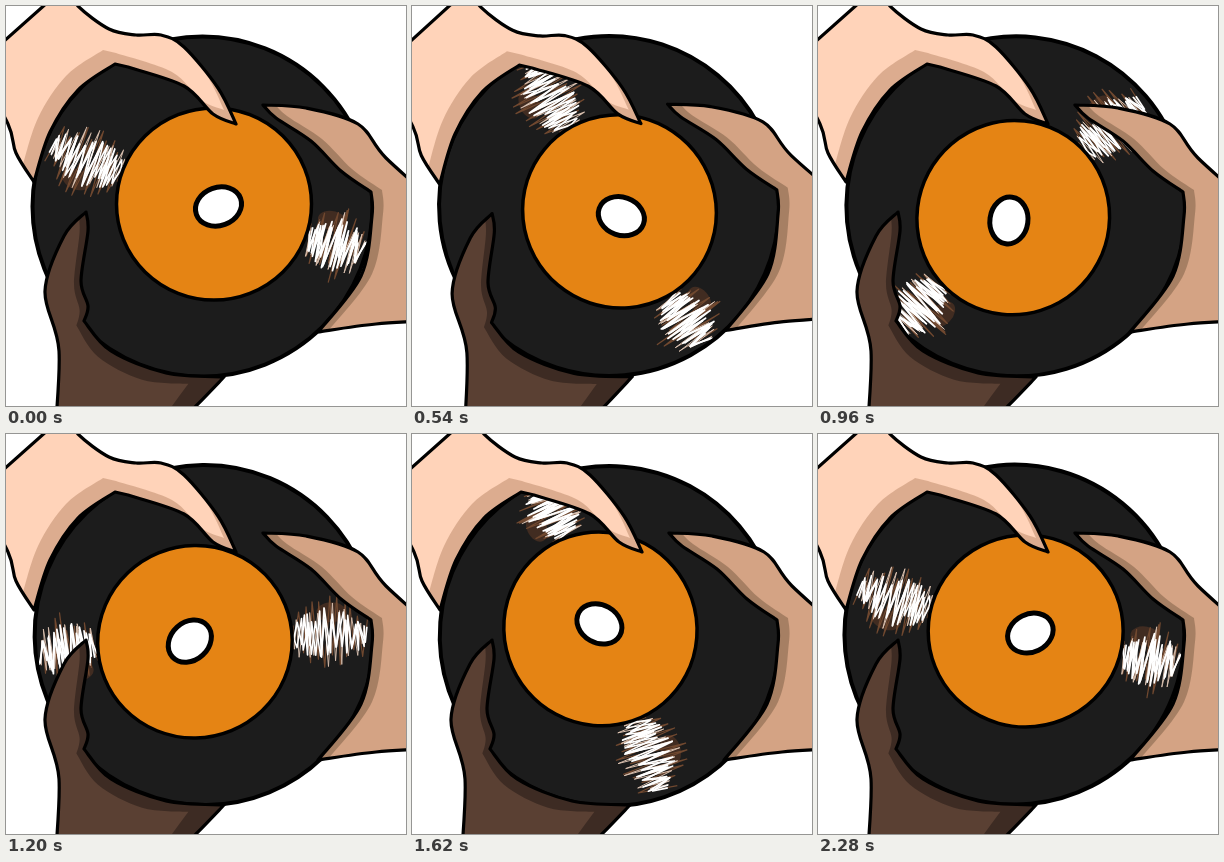
Recreate the animation shown at these times as an HTML page with a canvas. Size 400 by 400 pixels, loop 2.31 s.

```html
<!DOCTYPE html>
<html lang="en">
<head>
<meta charset="utf-8">
<title>Hands spinning a record</title>
<style>
html, body { margin: 0; width: 100%; height: 100%; overflow: hidden; background: #fff; }
canvas { display: block; }
</style>
</head>
<body>
<canvas id="stage" width="400" height="400"></canvas>
<script>
const ctx = document.getElementById('stage').getContext('2d');
const LOOP = 2310, STEP = 30, PULL = 330;
const PIVOT = [197.5, 201];

// Smooth runs of key points, joined by sharp corners at each "|".
function curve(text) {
  const path = new Path2D();
  for (const run of text.split('|')) {
    const p = run.split(' ').map(point => point.split(',').map(Number));
    path.lineTo(...p[0]);
    for (let i = 0; i < p.length - 1; i++) {
      const a = p[i - 1] || p[i], b = p[i], c = p[i + 1], d = p[i + 2] || c;
      path.bezierCurveTo(
        b[0] + (c[0] - a[0]) / 6, b[1] + (c[1] - a[1]) / 6,
        c[0] - (d[0] - b[0]) / 6, c[1] - (d[1] - b[1]) / 6, ...c);
    }
  }
  path.closePath();
  return path;
}

// "lit" maps the outline onto its lit part: scale x, scale y, move x, move y.
const hands = [
  {
    skin: '#ffd3b9', shadow: '#dcac8f', lit: [1, 1, -12, -14],
    shape: curve('60,-20 72,0 103,23 130,29 155,29 178,41 212,82 230,118|' +
      '230,118 207,108 178,80 122,61|109,58 72,84 44,126 28,176|28,176 10,147 2,118 -30,60')
  },
  {
    skin: '#d4a384', shadow: '#a67f63', lit: [1, 1, 11, -2],
    shape: curve('257,99 300,102 352,118 380,152 440,205|440,314 370,318 312,326|' +
      '312,326 355,270 366,210 365,186|365,186 335,165 305,135 270,112 257,99')
  },
  {
    skin: '#5a4033', shadow: '#3d2b23', lit: [0.8, 1.04, 8, -8],
    shape: curve('80,206 58,230 39,285 53,345 48,440|150,440 190,400 218,371|' +
      '218,371 160,367 105,345 78,315|78,315 82,300 75,275 82,225 80,206')
  }
];

function oval(x, y, rx, ry, tilt = 0) {
  const path = new Path2D();
  path.ellipse(x, y, rx, ry, tilt, 0, 2 * Math.PI);
  return path;
}

const disc = oval(196.5, 200.5, 170, 170);
const label = oval(208, 198, 97.5, 96);
const hole = oval(212.5, 200.5, 23.5, 19, -0.35);
const smudge = oval(128, -22, 15, 10);

let seed = 7;
const random = () => (seed = seed * 16807 % 2147483647) / 2147483647;

// A waveform running outwards along the x axis.
function waveform(from, to, count, height) {
  const path = new Path2D();
  for (let i = 0; i <= count; i++) {
    const u = i / count;
    const swing = height * (0.5 + 0.5 * Math.sin(Math.PI * u)) * (0.45 + 0.55 * random());
    path.lineTo(from + (to - from) * u + 5 * random(), i % 2 ? swing : -swing);
  }
  return path;
}

const scratches = [[202, 85, 160], [16, 107, 162]].map(([angle, from, to]) => ({
  angle,
  strokes: [
    ['#70482f', 1.2, waveform(from, to, 20, 40)],
    ['#d8bfae', 0.9, waveform(from, to, 22, 34)],
    ['#fff', 1.7, waveform(from, to, 26, 28)],
    ['#fff', 1.5, waveform(from, to, 18, 24)]
  ]
}));

function outline(path, color, width) {
  ctx.strokeStyle = color;
  ctx.lineWidth = width;
  ctx.stroke(path);
}

function fill(path, color) {
  ctx.fillStyle = color;
  ctx.fill(path);
}

function isolated(draw) {
  ctx.save();
  draw();
  ctx.restore();
}

function turn(degrees) {
  ctx.translate(...PIVOT);
  ctx.rotate(degrees * Math.PI / 180);
}

function turned(degrees, draw) {
  isolated(() => {
    turn(degrees);
    ctx.translate(-PIVOT[0], -PIVOT[1]);
    draw();
  });
}

function drawRecord() {
  fill(disc, '#1c1c1c');
  for (const { angle, strokes } of scratches) {
    isolated(() => {
      turn(angle);
      fill(smudge, '#412c21');
      strokes.forEach(([color, width, path]) => outline(path, color, width));
    });
  }
  outline(disc, '#000', 4);
  fill(label, '#e58414');
  outline(label, '#000', 3.5);
  fill(hole, '#fff');
  outline(hole, '#000', 5);
}

function drawHand({ skin, shadow, lit: [sx, sy, dx, dy], shape }) {
  fill(shape, shadow);
  isolated(() => {
    ctx.clip(shape);
    ctx.transform(sx, 0, 0, sy, dx, dy);
    fill(shape, skin);
  });
  outline(shape, '#000', 3.2);
}

// A short pull back, then one full turn that starts fast and settles.
function recordAngle(t) {
  if (t < PULL) return -2.5 * (1 - Math.cos(Math.PI * t / PULL));
  const p = (t - PULL) / (LOOP - PULL);
  return -5 + 365 * p + 11 * Math.sin(2 * Math.PI * p) * (1 - p);
}

const handAngle = t => t < 2 * PULL ? -1.4 * Math.sin(Math.PI * t / (2 * PULL)) : 0;

function frame(now) {
  const t = Math.floor(now % LOOP / STEP) * STEP;
  fill(oval(200, 200, 300, 300), '#fff');
  ctx.lineJoin = 'round';
  turned(recordAngle(t), drawRecord);
  turned(handAngle(t), () => hands.forEach(drawHand));
  requestAnimationFrame(frame);
}
frame(performance.now());
</script>
</body>
</html>
```
